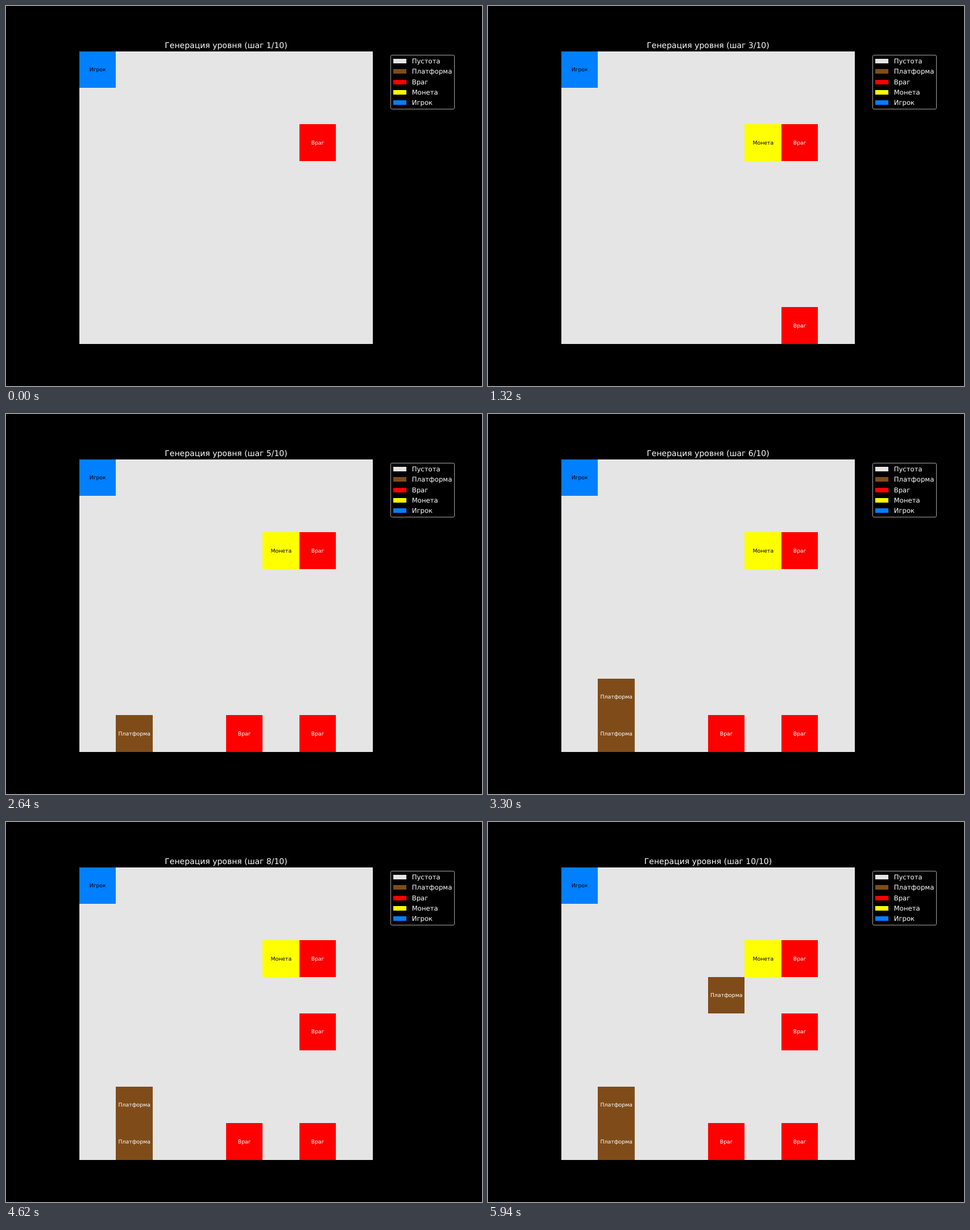
Recreate the animation shown at these times as an HTML page. Size 837x669 px, loop 6.6 s.

```html
<!DOCTYPE html>
<html lang="ru">
<head>
<meta charset="utf-8">
<style>
  html, body { margin: 0; width: 100%; height: 100%; overflow: hidden; background: #000; }
  svg { display: block; font-family: "DejaVu Sans", sans-serif; text-rendering: geometricPrecision; }
</style>
</head>
<body>
<svg id="stage" width="837" height="669" viewBox="0 0 837 669"></svg>
<script>
const STEP_MS = 660, STEPS = 10;
const KINDS = {
  empty: { label: 'Пустота', fill: '#e5e5e5' },
  platform: { label: 'Платформа', fill: '#7f4c19', ink: '#fff' },
  enemy: { label: 'Враг', fill: '#f00', ink: '#fff' },
  coin: { label: 'Монета', fill: '#ff0', ink: '#000' },
  player: { label: 'Игрок', fill: '#007fff', ink: '#000' }
};
// [step at which the tile appears, kind, column, row]
const TILES = [
  [1, 'player', 0, 0],
  [1, 'enemy', 6, 2],
  [2, 'enemy', 6, 7],
  [3, 'coin', 5, 2],
  [4, 'platform', 1, 7],
  [5, 'enemy', 4, 7],
  [6, 'platform', 1, 6],
  [8, 'enemy', 6, 4],
  [10, 'platform', 4, 3]
];

const stage = document.getElementById('stage');
const columnX = column => Math.floor(129 + 64.5 * column);
const rowY = row => Math.round(79.6 + 64.4 * row);

function add(parent, tag, attributes, text = '') {
  const node = document.createElementNS('http://www.w3.org/2000/svg', tag);
  for (const name in attributes) node.setAttribute(name, attributes[name]);
  node.textContent = text;
  return parent.appendChild(node);
}

function addRect(parent, x, y, width, height, fill) {
  return add(parent, 'rect', { x, y, width, height, fill });
}

function addText(parent, x, y, size, fill, anchor, text) {
  return add(parent, 'text', { x, y, fill, 'font-size': size, 'text-anchor': anchor }, text);
}

function addTile([step, kind, column, row]) {
  const { label, fill, ink } = KINDS[kind];
  const group = add(stage, 'g', {});
  const x = columnX(column), y = rowY(row);
  addRect(group, x, y, columnX(column + 1) - x, rowY(row + 1) - y, fill);
  addText(group, 161.25 + 64.5 * column, 114.8 + 64.4 * row, 9.33, ink, 'middle', label);
  return { step, group };
}

function addLegend() {
  const frame = addRect(stage, 676.5, 86.5, 112, 95, '#000');
  frame.setAttribute('rx', 2.3);
  frame.setAttribute('stroke', '#ccc');
  frame.setAttribute('stroke-opacity', 0.8);
  Object.values(KINDS).forEach(({ label, fill }, i) => {
    const y = Math.round(93 + 18.3 * i);
    addRect(stage, 681, y, 23, 8, fill);
    addText(stage, 713.7, y + 8, 11.67, '#fff', 'start', label);
  });
}

addRect(stage, 129, 80, 516, 515, KINDS.empty.fill);
const title = addText(stage, 387, 73.5, 14, '#fff', 'middle', '');
const tiles = TILES.map(addTile);
addLegend();

let shownStep = 0;
function draw(now) {
  const step = Math.floor(now / STEP_MS) % STEPS + 1;
  if (step !== shownStep) {
    shownStep = step;
    title.textContent = `Генерация уровня (шаг ${step}/${STEPS})`;
    for (const tile of tiles) {
      tile.group.setAttribute('visibility', tile.step <= step ? 'visible' : 'hidden');
    }
  }
  requestAnimationFrame(draw);
}
draw(performance.now());
</script>
</body>
</html>
```
